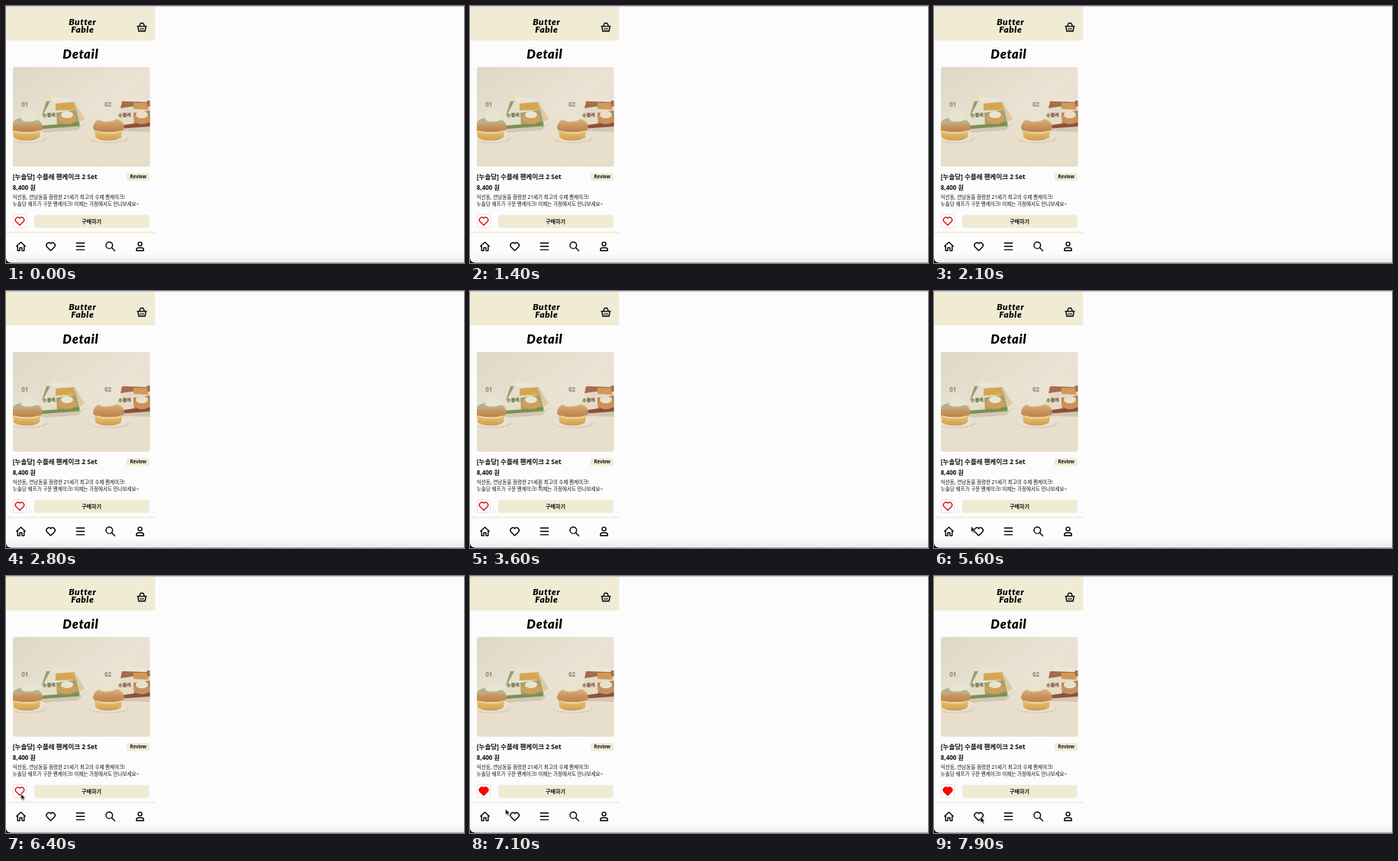
An HTML page that plays this animation: 600 px wide and 337 px high, repeating every 8 s.

```html
<!DOCTYPE html>
<html lang="ko">
<head>
<meta charset="utf-8">
<title>Detail</title>
<style>
  html, body { margin: 0; width: 100%; height: 100%; overflow: hidden; background: #fcfcfc; }
  svg { display: block; width: 100%; height: 100%; }

  text { font-family: "Noto Sans", "Noto Sans CJK KR", sans-serif; fill: #111; }
  .bold { font-weight: 700; }
  .mid { text-anchor: middle; }
  .brush { font-family: Lato, sans-serif; font-weight: 900; font-style: italic; fill: #000; }
  .logo { font-size: 11.8px; letter-spacing: .6px; }
  .head { font-size: 16.4px; letter-spacing: .7px; }
  .num { font-size: 8px; font-weight: 600; fill: #85837e; }
  .copy { font-size: 6.53px; font-weight: 500; }
  .icon { fill: none; stroke: #000; stroke-width: 1.4; stroke-linecap: round; stroke-linejoin: round; }

  .fill, .cursor, .arrow, .beam { animation: 8s infinite both; }
  .fill { animation-name: like; animation-timing-function: step-end; }
  .cursor { animation-name: move; }
  .arrow { animation-name: arrow; animation-timing-function: step-end; }
  .beam { animation-name: beam; animation-timing-function: step-end; }

  @keyframes like {
    0% { opacity: 0; }
    83.75%, 100% { opacity: 1; }
  }
  @keyframes move {
    0%, 40% { transform: translate(374px, 252px); animation-timing-function: steps(4); }
    45%, 47.5% { transform: translate(91.5px, 253.5px); animation-timing-function: steps(4); }
    52.5%, 68.75% { transform: translate(58.3px, 316px); animation-timing-function: steps(4); }
    73.75%, 86.25% { transform: translate(19.6px, 285.4px); animation-timing-function: steps(3); }
    90%, 91.25% { transform: translate(60px, 315.5px); animation-timing-function: steps(3); }
    95%, 100% { transform: translate(61px, 315.8px); }
  }
  @keyframes arrow {
    0% { opacity: 0; }
    40% { opacity: 1; }
    43.75% { opacity: 0; }
    48.75%, 100% { opacity: 1; }
  }
  @keyframes beam {
    0% { opacity: 0; }
    43.75% { opacity: 1; }
    48.75%, 100% { opacity: 0; }
  }
</style>
</head>
<body>
<svg viewBox="0 0 600 337" preserveAspectRatio="none">
  <defs>
    <linearGradient id="wall" x1="0" y1="0" x2="1" y2="1">
      <stop offset="0" stop-color="#dfd8c7"/>
      <stop offset=".5" stop-color="#eae3d3"/>
      <stop offset="1" stop-color="#e7dfcc"/>
    </linearGradient>
    <linearGradient id="table" x1="0" y1="0" x2="0" y2="1">
      <stop offset="0" stop-color="#e9e1cf" stop-opacity="0"/>
      <stop offset=".4" stop-color="#e8e0cd"/>
      <stop offset="1" stop-color="#e6deca"/>
    </linearGradient>
    <linearGradient id="sponge" x1="0" y1="0" x2="0" y2="1">
      <stop offset="0" stop-color="#edd08a"/>
      <stop offset=".55" stop-color="#dfb35f"/>
      <stop offset="1" stop-color="#cf9c50"/>
    </linearGradient>
    <linearGradient id="bun" x1="0" y1="0" x2="0" y2="1">
      <stop offset="0" stop-color="#dcb988"/>
      <stop offset=".55" stop-color="#c99560"/>
      <stop offset="1" stop-color="#b98250"/>
    </linearGradient>
    <linearGradient id="edge" x1="0" y1="0" x2="0" y2="1">
      <stop offset="0" stop-color="#fcfcfc"/>
      <stop offset="1" stop-color="#ececec"/>
    </linearGradient>
    <clipPath id="photo"><rect x="9" y="80" width="179.5" height="130.5" rx="3"/></clipPath>
    <path id="heart" d="M0 5.4L-5.1 .3A3.35 3.35 0 0 1 0-4A3.35 3.35 0 0 1 5.1 .3Z"/>
    <g id="cake">
      <ellipse cx="1" cy="13.5" rx="26" ry="6.5" fill="#d8cfbb"/>
      <ellipse cy="12" rx="25" ry="6.5" fill="#e9e1d0"/>
      <path d="M-18 0H18L17 12Q12 16.5 0 16.5T-17 12Z" fill="url(#sponge)"/>
      <path d="M-20 0C-20-8-13-13.5 0-13.5S21-8 21 0C20 4.5 12 5.5 0 5.5S-19 4.5-20 0Z" fill="url(#bun)"/>
      <path d="M-17 3Q0 8 18 3Q15 7 0 7.5Q-14 7-17 3Z" fill="#edd6a2"/>
    </g>
    <path id="cream" d="M-11 1C-11-4-7-6-4-7C-3-11 1-12 3-9C5-6 10-5 11 0C9 4-9 5-11 1Z" fill="#e9e3d1"/>
  </defs>

  <rect width="600" height="337" fill="#fcfcfc"/>
  <rect width="195.4" height="44.2" y="1" fill="#f0ebd3"/>
  <rect width="600" height="1" fill="#b9c1d8"/>

  <g class="mid">
    <text class="brush logo" x="100.3" y="25">Butter</text>
    <text class="brush logo" x="100.3" y="35.2">Fable</text>
    <text class="brush head" x="97.8" y="69.2">Detail</text>
  </g>

  <g class="icon" transform="translate(178 28)">
    <path d="M-6-1.4H6M-5.2-1.2L-4.2 5H4.2L5.2-1.2M-3.4-1.6L-1.7-5.5H1.7L3.4-1.6"/>
    <path d="M-2 1.2V3M0 1.2V3M2 1.2V3" stroke-width="1"/>
  </g>

  <g clip-path="url(#photo)">
    <rect x="9" y="80" width="180" height="131" fill="url(#wall)"/>
    <rect x="9" y="130" width="180" height="81" fill="url(#table)"/>

    <path d="M44 162L98 157L106 151L94 163L50 166Z" fill="#d2c8b2"/>
    <path d="M89 124.5L103.5 148L96 152Z" fill="#d9cba6"/>
    <path d="M53 125L89 124.5L96 157L43.5 161.5Z" fill="#e5dfc8"/>
    <path d="M65 128L89 126L92 136L65 137Z" fill="#d3a752"/>
    <path d="M66 140L92 136L96 153L67 157Z" fill="#a8a068"/>
    <path d="M53 125L58 124.8L48 143L47 143Z" fill="#8d9e68"/>
    <path d="M44 157L70 155L96 152L96.5 157.5L43.5 161.5Z" fill="#7d8f55"/>
    <path d="M60 119L85 121L87 126L60 125.5Z" fill="#ebe5d6"/>
    <ellipse cx="80" cy="147.5" rx="12" ry="7.5" fill="#cf9f5d"/>
    <ellipse cx="80" cy="142.5" rx="8" ry="4.5" fill="#e6e5cd"/>
    <text x="48" y="146" font-size="6.2" class="bold" transform="rotate(-4 48 146)" style="fill:#4e5a36">수플레</text>

    <path d="M145 160L189 158V165L150 164Z" fill="#d2c8b2"/>
    <path d="M152 125L189 124V158L146 161Z" fill="#e5dbc5"/>
    <path d="M152 125L189 124V132L171 131L150 134Z" fill="#a46c50"/>
    <path d="M167 127H184L187 136L167 135Z" fill="#cf9a56"/>
    <path d="M167 140L189 137V155L168 156Z" fill="#b0805c"/>
    <path d="M147 157L168 154L189 153V158L146 161Z" fill="#8f4e3e"/>
    <path d="M156 119L183 121L185 126L157 125Z" fill="#ebe5d6"/>
    <ellipse cx="178" cy="147.5" rx="11" ry="7.5" fill="#c89257"/>
    <ellipse cx="178" cy="142.5" rx="8" ry="4.8" fill="#eadfc8"/>
    <text x="147" y="146" font-size="6.2" class="bold" transform="rotate(-4 147 146)" style="fill:#66402f">수플레</text>

    <use href="#cake" x="27" y="160"/>
    <path d="M7 156C10 147 20 146 28 146.5S45 149 47 155Q38 153 26 154T7 156Z" fill="#b5b184"/>
    <use href="#cream" x="31" y="148"/>
    <use href="#cake" x="134" y="160"/>
    <use href="#cream" x="133.5" y="148"/>

    <text class="num" x="20.3" y="132.4">01</text>
    <text class="num" x="129" y="132.4">02</text>
  </g>

  <text class="bold" x="8.8" y="226.8" font-size="8.5">[누솔당] 수플레 팬케이크 2 Set</text>
  <rect x="158" y="219" width="30" height="10.2" rx="1.5" fill="#f0ebd3"/>
  <text class="bold mid" x="173.2" y="226.2" font-size="6.1">Review</text>
  <text class="bold" x="8.8" y="241" font-size="8">8,400 원</text>
  <text class="copy" x="8.8" y="253.2">익선동, 연남동을 점령한 21세기 최고의 수제 팬케이크!</text>
  <text class="copy" x="8.8" y="261.6">누솔당 쉐프가 구운 팬케이크! 이제는 가정에서도 만나보세요~</text>

  <rect x="9.5" y="273.5" width="17" height="17" rx="2.5" fill="#fff" stroke="#e2e2e2"/>
  <use href="#heart" x="18" y="282.2" fill="none" stroke="#e01212" stroke-width="1.4" stroke-linejoin="round"/>
  <use class="fill" href="#heart" x="18" y="282.2" fill="#f00" stroke="#f00" stroke-width="1.2" stroke-linejoin="round"/>
  <rect x="37" y="274" width="150.5" height="17" rx="2" fill="#f0ebd3"/>
  <text class="bold mid" x="112" y="284.6" font-size="7.1">구매하기</text>

  <rect y="296" width="195.4" height="1.6" fill="#f0ebd3"/>
  <rect y="324" width="600" height="13" fill="url(#edge)"/>
  <g class="icon">
    <path d="M13.8 315L19.5 309.7L25.2 315M15.2 314V320.8H18V317H21V320.8H23.8V314"/>
    <use href="#heart" x="58.6" y="315.4"/>
    <path d="M92.3 310.8H102.7M92.3 315.2H102.7M92.3 319.6H102.7"/>
    <circle cx="135.3" cy="313.8" r="4.3"/>
    <path d="M138.6 317.1L142.5 321"/>
    <circle cx="175.6" cy="312.1" r="2.5"/>
    <path d="M170.9 320.8V319.6Q171 317 173.6 317H177.6Q180.2 317 180.3 319.6V320.8Z"/>
  </g>

  <rect y="336" width="600" height="1" fill="#a9a9a9"/>
  <path d="M0 331Q.6 336.2 6 336.4V337H0Z" fill="#000"/>

  <g class="cursor">
    <path class="arrow" d="M0 0V8L1.9 6.3L3.2 9.2L4.6 8.6L3.3 5.8H5.8Z" fill="#000" stroke="#fff" stroke-width=".6"/>
    <path class="beam" d="M-1.3-4.3Q0-4.3 0-3.3Q0-4.3 1.3-4.3M0-3.3V3.3M-1.3 4.3Q0 4.3 0 3.3Q0 4.3 1.3 4.3M-.8 1.6H.8" fill="none" stroke="#222" stroke-width=".8"/>
  </g>
</svg>
</body>
</html>
```
